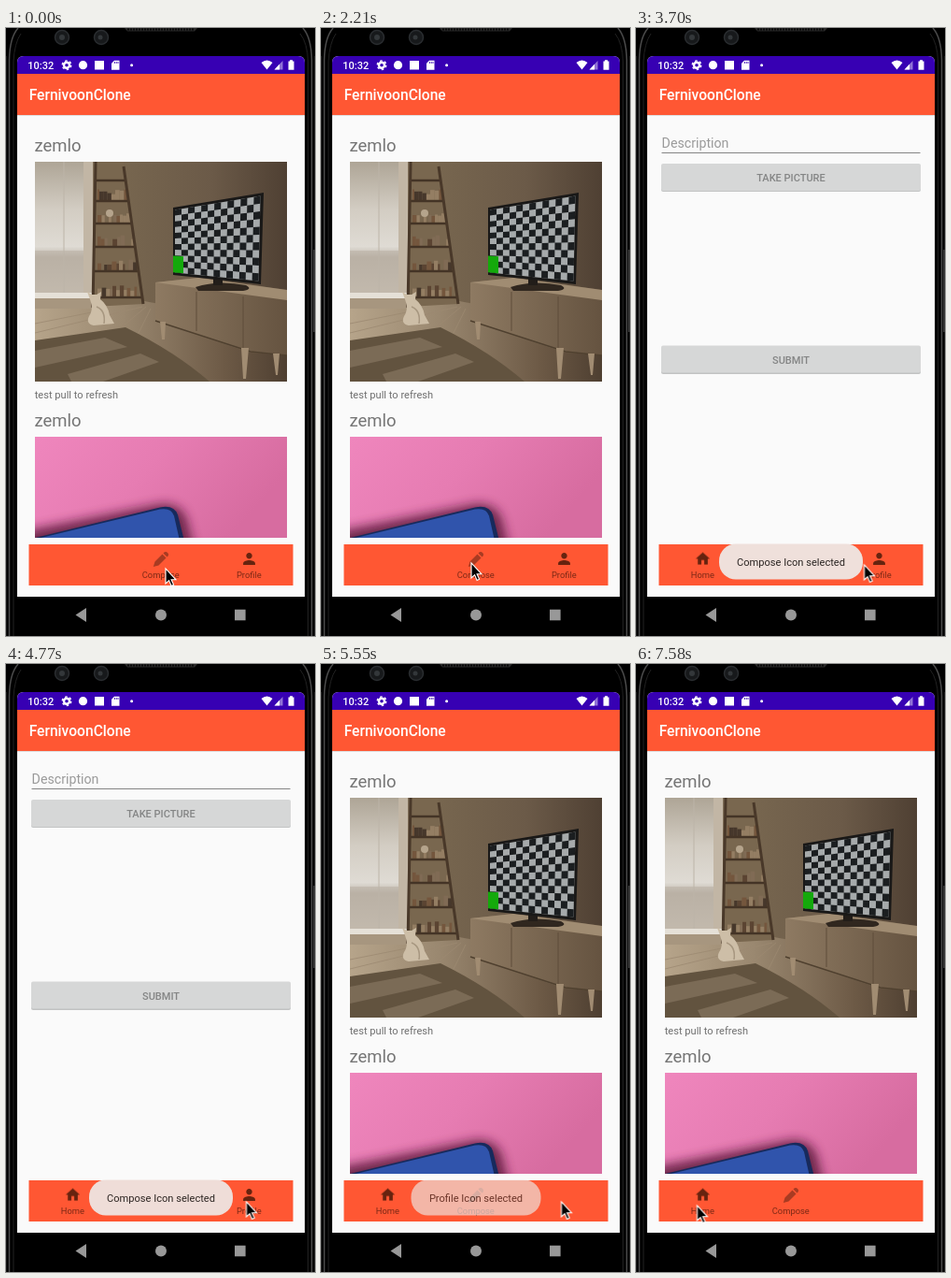
Recreate the animation shown at these times as an HTML page. Size 331 by 650 pixels, loop 8000 ms.

```html
<!DOCTYPE html>
<html lang="en">
<head>
<meta charset="utf-8">
<title>Photo feed</title>
<style>
html, body { margin: 0; width: 100%; height: 100%; overflow: hidden; background: #000; }
svg { display: block; width: 331px; height: 650px; font-family: Roboto, "Open Sans", sans-serif; }
.mid { text-anchor: middle; }
.bold { font-weight: 500; }
.name { font-size: 18.5px; fill: #757575; }
.button { font-size: 11px; fill: #848585; }
.label { font-size: 9.4px; fill: #7c2916; transform-box: fill-box; transform-origin: center; }
.note { font-size: 11.1px; fill: #2b2523; }

/* One shared 8 s timeline: 1% = 80 ms */
.feed, .form, .tab { animation: 8s step-end infinite; }
.icon, .label, .toast, .cursor { animation: 8s linear infinite; }
.feed { animation-name: feed; }
.form { animation-name: form; }
.home { animation-name: home; }
.compose { animation-name: compose; }
.profile { animation-name: profile; }
.home .icon { animation-name: homeIcon; }
.home .label { animation-name: homeLabel; }
.compose .icon { animation-name: composeIcon; }
.compose .label { animation-name: composeLabel; }
.toast1 { animation-name: toast1; }
.toast2 { animation-name: toast2; }
.cursor { animation-name: cursor; }

@keyframes feed { 0%, 68.5%, 100% { opacity: 1; } 36.25% { opacity: 0; } }
@keyframes form { 0%, 65.125%, 100% { opacity: 0; } 36.25% { opacity: 1; } }
@keyframes home { 0% { opacity: 0; } 36.25%, 100% { opacity: 1; } }
@keyframes compose { 0%, 65.125%, 100% { opacity: 1; } 36.25% { opacity: 0; } }
@keyframes profile { 0% { opacity: 1; } 65.125%, 100% { opacity: 0; } }
@keyframes homeIcon {
  0%, 36.8% { transform: translateY(-2px); }
  38.4%, 100% { transform: none; }
}
@keyframes homeLabel {
  0%, 36.8% { transform: scale(1.17); }
  38.4%, 100% { transform: scale(1); }
}
@keyframes composeIcon {
  0%, 36.2% { transform: none; }
  37%, 65.7% { transform: translateY(-2px); }
  67.3%, 100% { transform: none; }
}
@keyframes composeLabel {
  0%, 36.2% { transform: scale(1); }
  37%, 65.7% { transform: scale(1.17); }
  67.3%, 100% { transform: scale(1); }
}
@keyframes toast1 {
  0%, 36.9% { opacity: 0; }
  40.6%, 59.6% { opacity: 1; }
  62.5%, 100% { opacity: 0; }
}
@keyframes toast2 {
  0%, 66.25% { opacity: 0; }
  70.75%, 90.4% { opacity: 1; }
  93.2%, 100% { opacity: 0; }
}
@keyframes cursor {
  0%, 1.12% { transform: translate(171px, 579px); }
  1.75%, 19.37% { transform: translate(163px, 577px); }
  19.375% { transform: translate(165px, 576px); }
  21.25% { transform: translate(173px, 585px); }
  23.125% { transform: translate(165px, 596px); }
  25% { transform: translate(149px, 592px); }
  26.25% { transform: translate(146px, 580px); }
  27.625%, 39.4% { transform: translate(161px, 573px); }
  46.25%, 46.4% { transform: translate(244.5px, 575px); }
  50.75%, 54.8% { transform: translate(259px, 576px); }
  56.375%, 76.7% { transform: translate(257.5px, 576px); }
  78.125% { transform: translate(215px, 612px); }
  78.875% { transform: translate(165px, 628px); }
  79.625% { transform: translate(115px, 612px); }
  80.25% { transform: translate(85.5px, 588px); }
  82% { transform: translate(72px, 583px); }
  83.75% { transform: translate(61px, 588px); }
  86.75%, 87.5% { transform: translate(61px, 589px); }
  90% { transform: translate(62px, 584px); }
  94.75%, 100% { transform: translate(65.5px, 580px); }
}
</style>
</head>
<body>
<svg viewBox="0 0 331 650">
  <defs>
    <clipPath id="room"><path d="M31 143h270v235H31z"/></clipPath>
    <clipPath id="desk"><path d="M31 437h270v108H31z"/></clipPath>
    <linearGradient id="wall">
      <stop offset="0" stop-color="#8b7a67"/><stop offset=".35" stop-color="#77664f"/>
      <stop offset=".7" stop-color="#6b5a48"/><stop offset="1" stop-color="#4f4033"/>
    </linearGradient>
    <linearGradient id="sky" x2="0" y2="1">
      <stop offset="0" stop-color="#aea596"/><stop offset=".35" stop-color="#d3cdc3"/>
      <stop offset=".62" stop-color="#dfdbd4"/><stop offset=".7" stop-color="#bdb5a9"/>
      <stop offset="1" stop-color="#d0c8bb"/>
    </linearGradient>
    <linearGradient id="floor">
      <stop offset="0" stop-color="#b6a48a"/><stop offset=".35" stop-color="#9a8870"/>
      <stop offset=".75" stop-color="#6d5a46"/><stop offset="1" stop-color="#4e3f31"/>
    </linearGradient>
    <linearGradient id="cabinet">
      <stop offset="0" stop-color="#8e7a62"/><stop offset="1" stop-color="#655340"/>
    </linearGradient>
    <linearGradient id="pink" y2=".35">
      <stop offset="0" stop-color="#ef86bd"/><stop offset=".5" stop-color="#e67cb2"/>
      <stop offset="1" stop-color="#d76ca0"/>
    </linearGradient>
    <filter id="soft" x="-30%" y="-30%" width="160%" height="160%"><feGaussianBlur stdDeviation="6"/></filter>
  </defs>

  <!-- Phone body -->
  <path d="M0 0h331v650H0z"/>
  <g fill="none">
    <path d="M3.5 650V34Q4 10 13 0M327.500 650V34Q327 10 318 0" stroke="#4b4b4b" stroke-width="1.500"/>
    <path d="M.5 650V30M330.500 650V30" stroke="#171717"/>
    <path d="M8 650V36Q9 16 16 6M323.500 650V36Q323 16 315 6" stroke="#222"/>
  </g>
  <path d="M329 237h2v88h-2z" fill="#353535"/>
  <g fill="#17191b" stroke="#2a2d30" stroke-width="1.500">
    <circle cx="60" cy="10" r="7.500"/><circle cx="102" cy="10" r="7.500"/>
  </g>
  <g fill="#33373a"><circle cx="60" cy="10" r="3"/><circle cx="101" cy="10" r="2.500"/></g>
  <path d="M127 0h78l-3 3.500h-72z" fill="#292929"/>
  <path d="M130 1.500h72" stroke="#080808" stroke-width="2" stroke-dasharray="2 1"/>

  <!-- Screen -->
  <path d="M12 608V37q0-7 7-7h294q7 0 7 7v571z" fill="#fafafa"/>
  <path d="M12 49V37q0-7 7-7h294q7 0 7 7v12z" fill="#3700b3"/>
  <path d="M12 49h308v44H12z" fill="#ff5733"/>
  <path d="M12 93.500h308" stroke="#dedede"/>
  <g fill="#fff">
    <text class="bold" x="23.300" y="43.600" font-size="11">10:32</text>
    <circle cx="65" cy="39.700" r="3" fill="none" stroke="#fff" stroke-width="2.400"/>
    <circle cx="65" cy="39.700" r="4.700" fill="none" stroke="#fff" stroke-width="1.500" stroke-dasharray="2.460"/>
    <circle cx="82.500" cy="39.700" r="4.600"/>
    <rect x="95" y="35" width="10" height="9.500"/>
    <path d="M116 34.700h5.500v10h-8.500v-7z"/>
    <path d="M116.500 36v2M118.300 36v2M120 36v2" stroke="#3700b3" stroke-width=".8"/>
    <circle cx="134.600" cy="39.700" r="1.500"/>
    <path d="M273.500 37q6-5 12 0l-6 7.500z"/>
    <path d="M287.500 44.500l9-9.500v9.500z" opacity=".45"/><path d="M287.500 44.500l5.500-5.800v5.800z"/>
    <path d="M304 34.300h3v1.200h1.500v9.200h-6v-9.200h1.500z"/>
    <text class="bold" x="24.700" y="77.200" font-size="15.600">FernivoonClone</text>
  </g>

  <!-- Feed -->
  <g class="feed">
    <text class="name" x="30.500" y="131.500">zemlo</text>
    <g clip-path="url(#room)">
      <path d="M31 143h270v235H31z" fill="url(#wall)"/>
      <path d="M31 298l117-6 153 28v58H31z" fill="url(#floor)"/>
      <path d="M31 143h61v146H31z" fill="url(#sky)"/>
      <path d="M31 238h53v46H31z" fill="#b7aea1" opacity=".5"/>
      <path d="M62 143v144" stroke="#bcb4a8"/>
      <path d="M83 143h10v148H83z" fill="#c2b6a5"/>
      <path d="M31 283h61v6H31z" fill="#e5e0d7"/>
      <path d="M31 289h61v11H31z" fill="#a7967f"/>
      <path d="M31 316l76-15M31 326l115-28M55 378l95-80M130 350l25-50" stroke="#9c8a71" stroke-width=".8"/>
      <g id="shelf"></g>
      <path d="M96 143l-3 156M126 148l21 147" stroke="#493829" stroke-width="3"/>
      <path d="M31 334l97-14q53 26 90 58H31z" fill="#62533f"/>
      <path d="M31 345l75-14 24 10-99 22zM66 370l78-22 20 9-60 21H70z" fill="#897863" opacity=".65"/>
      <path d="M160 272l46-5 95 13v70l-39-3-102-33z" fill="url(#cabinet)"/>
      <path d="M160 272l46-5 95 13v11z" fill="#a08c72"/>
      <path d="M204 282v42M254 287v58" stroke="#5e4c3a"/>
      <path d="M160 313l102 33 39 4" fill="none" stroke="#4f402f" stroke-width="1.500"/>
      <path d="M165 314h6l-1 19h-3zM252 342h8l-3 33h-3zM286 348h7l-2 23h-2z" fill="#a18c72"/>
      <path d="M203 277q24-8 54-2 8 4-3 6l-48 0z" fill="#30271f"/>
      <path d="M222 262h10v13h-10z" fill="#221d19"/>
      <path d="M179 192l97-16-3 98-94-10z" fill="#191817"/>
      <path d="M181 194.500l91.500-15-2 91-89.500-9z" fill="#a6aaab"/>
      <path id="checks" fill="#1b1e20"/>
      <path d="M179 243.500l11 .7v18l-11-1z" fill="#14a90b"/>
      <path d="M90 290l-3-8 5 3h5l5-3-1 8q8 6 10 17l5 9-22 2q-9-2-5-10 3-4 3-11z" fill="#cdbea7"/>
      <path d="M97 298q10 4 8 18" fill="none" stroke="#a79780" stroke-width="1.500"/>
    </g>
    <text x="30.700" y="396.300" font-size="11.100" fill="#6f6f6f">test pull to refresh</text>
    <text class="name" x="30.500" y="425.800">zemlo</text>
    <g clip-path="url(#desk)">
      <path d="M31 437h270v108H31z" fill="url(#pink)"/>
      <path d="M20 538l146-29q23-1 28 18l8 33H20z" fill="#591739" opacity=".85" filter="url(#soft)"/>
      <path d="M25 546.500l140-34q15-3 19 8l8 32H25z" fill="#172a5c"/>
      <path d="M25 548l140-33.500q12-2 15 7l7 31H25z" fill="#3054ac"/>
    </g>
  </g>

  <!-- Post form -->
  <g class="form">
    <text x="27.600" y="128.300" font-size="14.200" fill="#9a9a9a">Description</text>
    <path d="M27.500 133.500h277" stroke="#858585"/>
    <g fill="#c2c3c3"><rect x="27" y="146" width="278" height="29" rx="2"/><rect x="27" y="341" width="278" height="29" rx="2"/></g>
    <g fill="#d6d7d7"><rect x="27" y="145" width="278" height="29" rx="2"/><rect x="27" y="339.500" width="278" height="29" rx="2"/></g>
    <text class="mid bold button" x="166" y="164">TAKE PICTURE</text>
    <text class="mid bold button" x="166" y="358.500">SUBMIT</text>
  </g>

  <!-- Tabs -->
  <path d="M24.500 552h283v44h-283z" fill="#ff5733"/>
  <g class="tab home">
    <g class="icon"><path transform="translate(62.400 558.300) scale(.76)" fill="#66230f" d="M10 20v-6h4v6h5v-8h3L12 3 2 12h3v8z"/></g>
    <text class="mid label" x="71.400" y="587.600">Home</text>
  </g>
  <g class="tab compose">
    <g class="icon"><path fill="#a83b22" d="M157.800 576l1.700-5.500 8-8 4 4-8 8zM168.500 561.500l1.300-1.200q1.700-1 3.300.6t.7 3.300l-1.300 1.300z"/></g>
    <text class="mid label" x="165.800" y="587.600">Compose</text>
  </g>
  <g class="tab profile">
    <path transform="translate(250.900 557.900) scale(.8)" fill="#66230f" d="M12 12c2.210 0 4-1.790 4-4s-1.790-4-4-4-4 1.790-4 4 1.790 4 4 4zm0 2c-2.670 0-8 1.340-8 4v2h16v-2c0-2.660-5.330-4-8-4z"/>
    <text class="mid label" x="260.300" y="587.600">Profile</text>
  </g>

  <!-- System keys -->
  <path d="M12 608h308v42H12z"/>
  <g fill="#989898">
    <path d="M74.500 627.500l11.500-7.500v15z"/>
    <circle cx="166" cy="627.500" r="6"/>
    <rect x="245" y="621.700" width="11.600" height="11.600"/>
  </g>

  <g class="toast toast1">
    <rect x="89" y="551.500" width="154" height="38" rx="18" fill="#efe0db"/>
    <text class="mid note" x="166" y="574.600">Compose Icon selected</text>
  </g>
  <g class="toast toast2">
    <rect x="96.500" y="551.500" width="139" height="38" rx="18" fill="#efe0db"/>
    <text class="mid note" x="166" y="574.600">Profile Icon selected</text>
  </g>

  <g class="cursor">
    <path d="M0-1v16l3.600-3.400 2.500 5.800 2.500-1.100-2.500-5.600h4.800z" stroke="#fff" stroke-width="1.100"/>
  </g>
</svg>
<script>
const mix = (a, b, t) => a + (b - a) * t;
const byId = id => document.getElementById(id);

// Checkerboard in perspective on the TV
const cols = 13, rows = 11;
const spot = (c, r) => {
  const u = c / cols, v = r / rows;
  const x = mix(181, mix(272.5, 270.5, v), u);
  return x.toFixed(1) + " " + mix(mix(194.5, 179.5, u), mix(261.5, 270.5, u), v).toFixed(1);
};
let checks = "";
for (let r = 0; r < rows; r++)
  for (let c = r % 2; c < cols; c += 2)
    checks += `M${spot(c, r)}L${spot(c + 1, r)}L${spot(c + 1, r + 1)}L${spot(c, r + 1)}z`;
byId("checks").setAttribute("d", checks);

// Leaning bookshelf with seeded books
let seed = 7;
const random = () => (seed = seed * 16807 % 2147483647) / 2147483647;
const tones = ["#5b4432", "#74563d", "#947e63", "#46372b", "#806b55"];
let shelf = '<path d="M96 143h30l21 152-54 3z" fill="#79674f"/>';
[163, 185, 209, 234, 260, 288].forEach((y, i) => {
  const right = 126 + (y - 148) / 7;
  for (let x = 98; i && x < right - 4;) {
    const w = 2 + random() * 3, h = 7 + random() * 6;
    if (random() > .12)
      shelf += `<rect x="${x}" y="${y - h}" width="${w}" height="${h}" fill="${tones[random() * 5 | 0]}"/>`;
    x += w;
  }
  shelf += `<path d="M95 ${y}H${right}" stroke="#443426" stroke-width="2.500"/>`;
});
shelf += '<circle cx="111" cy="198" r="4" fill="#b5a48c"/>';
byId("shelf").innerHTML = shelf;
</script>
</body>
</html>
```
